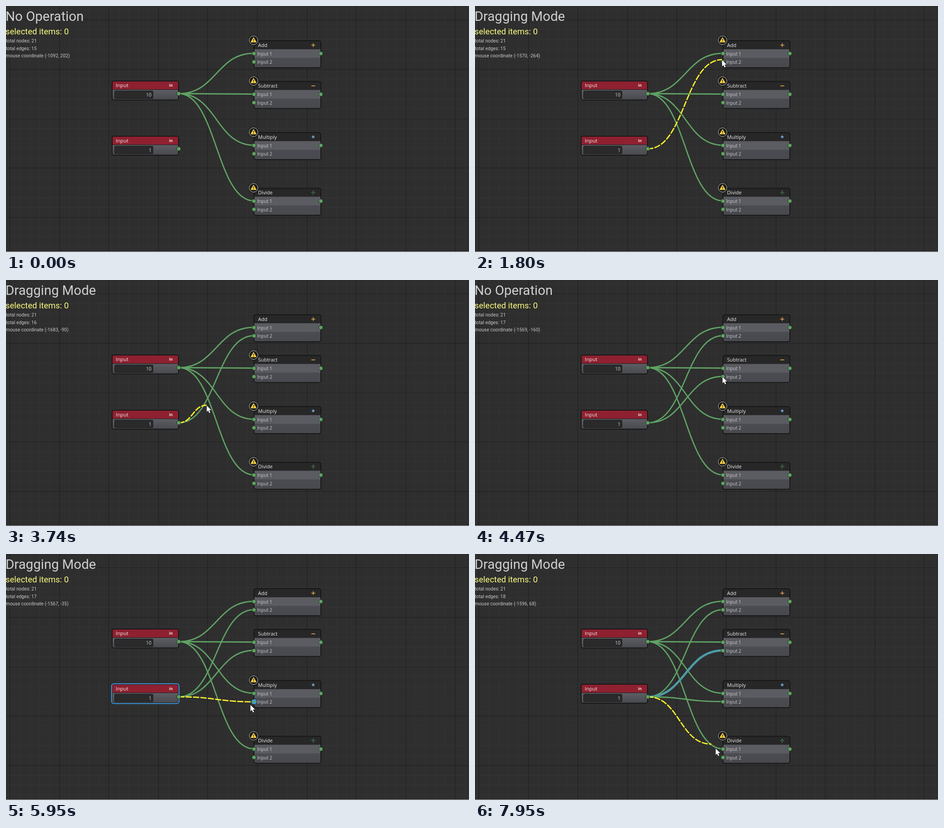
These frames come from a looping animation (1025 by 546 pixels, 8000 ms). An HTML page with a canvas:

```html
<!DOCTYPE html>
<html>
<head>
<meta charset="utf-8">
<style>
html, body { margin: 0; width: 100%; height: 100%; overflow: hidden; background: #2e2e2e; }
canvas { display: block; }
</style>
</head>
<body>
<canvas id="stage" width="1025" height="546"></canvas>
<script>
const g = document.getElementById('stage').getContext('2d');
const LOOP = 8000, GREEN = '#5fa264', BLUE = '#3f95d8';
const IN_X = 235, OUT_X = 382.5, OP_X = 549, OP_OUT = 697;
const inputs = [{ y: 166.5, value: '10' }, { y: 289, value: '1' }];
const ops = [
  { y: 77, name: 'Add', sign: '+', color: '#e0a050' },
  { y: 167.5, name: 'Subtract', sign: '−', color: '#e8b040' },
  { y: 281, name: 'Multiply', sign: '*', color: '#7ab4e8' },
  { y: 404.5, name: 'Divide', sign: '÷', color: '#58b060' }
];
const drags = [[1200, 2390], [3410, 4470], [5350, 6220], [7220, LOOP]];

// Pointer moves: start, end, steps, target x, y, and how far the arrow runs ahead
const moves = [
  [200, 200, 1, 915, 525], [260, 330, 2, 443, 372],
  [470, 930, 8, 384, 317],
  [1200, 1800, 10, 547, 120], [2060, 2190, 3, 548, 123],
  [2390, 3080, 10, 382, 317],
  [3410, 4140, 12, 548, 215], [4530, 5020, 8, 383, 318],
  [5350, 5880, 9, 549.7, 328.9], [5950, 5950, 1, 549.7, 328.9, -8.5, 6],
  [6220, 7010, 13, 383, 316], [7080, 7080, 1, 384, 316],
  [7220, 7950, 11, 523.3, 422.7, 9.5, 9]
];

function pointer(t) {
  let x = 983, y = 545, dx = 0, dy = 0;
  for (const [start, end, steps, tx, ty, ax = 0, ay = 0] of moves) {
    if (t < start) break;
    const gap = (end - start) / (steps - 1) || 1;
    const p = Math.min(1, (Math.floor((t - start) / gap + 1e-6) + 1) / steps);
    const e = p * p * (3 - 2 * p);
    x += (tx - x) * e;
    y += (ty - y) * e;
    dx = ax * e;
    dy = ay * e;
  }
  return { x, y, dx, dy };
}

function text(s, x, y, size, color, font = 'Open Sans', align = 'left', weight = '') {
  g.font = `${weight} ${size}px "${font}", sans-serif`;
  g.fillStyle = color;
  g.textAlign = align;
  g.fillText(s, x, y);
}

function box(x, y, w, h, r, fill, stroke, width = 1) {
  g.beginPath();
  g.roundRect(x, y, w, h, r);
  if (fill) { g.fillStyle = fill; g.fill(); }
  if (stroke) { g.strokeStyle = stroke; g.lineWidth = width; g.stroke(); }
}

function dot(x, y, r, fill, stroke, width = 1) {
  g.beginPath();
  g.arc(x, y, r, 0, 7);
  g.fillStyle = fill;
  g.fill();
  g.strokeStyle = stroke;
  g.lineWidth = width;
  g.stroke();
}

function poly(points, fill, stroke, width) {
  g.beginPath();
  for (let i = 0; i < points.length; i += 2) g.lineTo(points[i], points[i + 1]);
  g.closePath();
  g.lineJoin = 'round';
  g.strokeStyle = stroke;
  g.lineWidth = width;
  g.stroke();
  g.fillStyle = fill;
  g.fill();
}

function shade(y, h, top, bottom) {
  const s = g.createLinearGradient(0, y, 0, y + h);
  s.addColorStop(0, top);
  s.addColorStop(1, bottom);
  return s;
}

function socket(x, y, hot) {
  dot(x, y, 4.4, GREEN, hot ? '#2f9cf0' : '#22301f', hot ? 2.4 : 1);
}

function edge(x1, y1, x2, y2, color, width, dash = []) {
  const mid = (x1 + x2) / 2;
  g.beginPath();
  g.moveTo(x1, y1);
  g.bezierCurveTo(mid, y1, mid, y2, x2, y2);
  g.setLineDash(dash);
  g.lineDashOffset = 1.4;
  g.strokeStyle = color;
  g.lineWidth = width;
  g.stroke();
  g.setLineDash([]);
}

function gridLines(step, x0, y0, color) {
  g.fillStyle = color;
  for (let x = x0; x < 1025; x += step) g.fillRect(Math.round(x), 0, 1, 546);
  for (let y = y0; y < 546; y += step) g.fillRect(0, Math.round(y), 1025, 1);
}

function background() {
  g.fillStyle = '#2e2e2e';
  g.fillRect(0, 0, 1025, 546);
  gridLines(21.92, 8, 8.3, '#343434');
  gridLines(109.6, 8, 30.3, '#1e1e1e');
  g.fillStyle = '#b0b0b0';
  g.fillRect(0, 545, 1025, 1);
}

function inputNode({ y, value }, hover) {
  const w = 147, h = 42;
  box(IN_X, y, w, h, 4, shade(y + 19, h - 19, '#5d5e64', '#48494e'));
  box(IN_X, y, w, 19, [4, 4, 0, 0], '#8f2030');
  box(IN_X, y, w, h, 4, null, '#171717', 2);
  g.fillStyle = '#1b1b1b';
  g.fillRect(IN_X, y + 18.5, w, 1);
  box(240.5, y + 22, 85, 17, 2, '#2a2a2b', '#1a1a1a');
  if (hover) box(IN_X - 1, y - 1, w + 2, h + 2, 5, null, BLUE, 2.2);
  text('Input', 243, y + 13.5, 11.3, '#f0e8e8');
  text('in', 365, y + 12.5, 8.5, '#f0e8e8', 'Open Sans', 'center', 'bold');
  text(value, 322, y + 34.5, 10.4, '#d4d4d4', 'Open Sans', 'right');
  socket(OUT_X, y + 28);
}

function warning(y) {
  dot(548, y, 10.5, '#1c1c1c', '#111', 2);
  dot(548, y, 9.8, '#1c1c1c', '#d8d8d0', 1);
  poly([548, y - 5.5, 553.5, y + 4, 542.5, y + 4], '#f5d040', '#f5d040', 1.5);
  g.fillStyle = '#222';
  g.fillRect(547.3, y - 3, 1.5, 4);
  g.fillRect(547.3, y + 2, 1.5, 1.5);
}

function opNode({ y, name, sign, color }, wired, hot) {
  const w = 148, h = 60;
  box(OP_X, y, w, h, 4, shade(y + 38, 22, '#4b4c52', '#48494e'));
  box(OP_X, y, w, 19, [4, 4, 0, 0], '#272728');
  g.fillStyle = '#5b5c62';
  g.fillRect(OP_X, y + 19, w, 19);
  box(OP_X, y, w, h, 4, null, '#171717', 2);
  text(name, 558, y + 13.5, 11.1, '#ececec');
  g.fillStyle = color;
  if (sign === '*') {
    text(sign, 680, y + 17, 14, color, 'Open Sans', 'center', 'bold');
  } else {
    g.fillRect(676, y + 9, 8.5, sign === '÷' ? 1 : 1.6);
    if (sign === '+') g.fillRect(679.5, y + 5.5, 1.6, 8.5);
    if (sign === '÷') for (const d of [5.5, 12]) g.fillRect(679.3, y + d, 1.8, 1.8);
  }
  for (const i of [0, 1]) {
    const py = y + 28.5 + i * 18.5;
    text('Input ' + (i + 1), 556, py + 4, 10.1, '#cdcdd0');
    socket(OP_X, py, i && hot);
  }
  socket(OP_OUT, y + 28.5);
  if (!wired) warning(y - 1);
}

function arrow(x, y) {
  g.save();
  g.translate(x, y);
  poly([0, 0, 0, 14, 3.2, 11.2, 5.4, 16.5, 7.8, 15.5, 5.6, 10.3, 10, 10], '#fff', '#1a1a1a', 1.4);
  g.restore();
}

function draw(t) {
  const m = pointer(t);
  const dragging = drags.some(([a, b]) => t >= a && t < b);
  const made = drags.filter(d => t >= d[1]).length;
  const [y1, y2] = inputs.map(n => n.y + 28);

  background();
  for (const n of ops) edge(OUT_X, y1, OP_X, n.y + 28, GREEN, 2.8);
  ops.slice(0, made).forEach((n, i) => {
    const lit = i === 1 && t >= 6880;
    if (lit) edge(OUT_X, y2, OP_X, n.y + 46.5, BLUE, 5);
    edge(OUT_X, y2, OP_X, n.y + 46.5, GREEN, lit ? 2 : 2.8);
  });

  inputs.forEach((n, i) => inputNode(n, i === 1 && t >= 5000 && t < 6290));
  if (dragging) {
    edge(OUT_X, y2, m.x, m.y - 0.8, '#f7f02c', 2.8, [13.7, 2.7]);
    socket(OUT_X, y2);
  }
  ops.forEach((n, i) => {
    const hot = dragging && Math.hypot(m.x - OP_X, m.y - n.y - 47) < 4;
    opNode(n, i < made, hot);
  });

  text(dragging ? 'Dragging Mode' : 'No Operation', -1, 33, 29.5, '#cfcfcf', 'Roboto');
  text('selected items: 0', -1, 63, 18.5, '#fbfb80', 'Roboto');
  const sx = Math.round(-1751 + (m.x - 382) * 1.097);
  const sy = Math.round(-48 + (m.y - 317) * 1.097);
  ['total nodes: 21', `total edges: ${15 + made}`, `mouse coordinate (${sx}, ${sy})`]
    .forEach((s, i) => text(s, -0.5, 81 + i * 16.6, 10.4, '#c8c8c8', 'Roboto'));

  if (t >= 200) arrow(m.x + m.dx, m.y + m.dy);
}

const begin = performance.now();
function tick() {
  draw((performance.now() - begin) % LOOP);
  requestAnimationFrame(tick);
}
tick();
</script>
</body>
</html>
```
